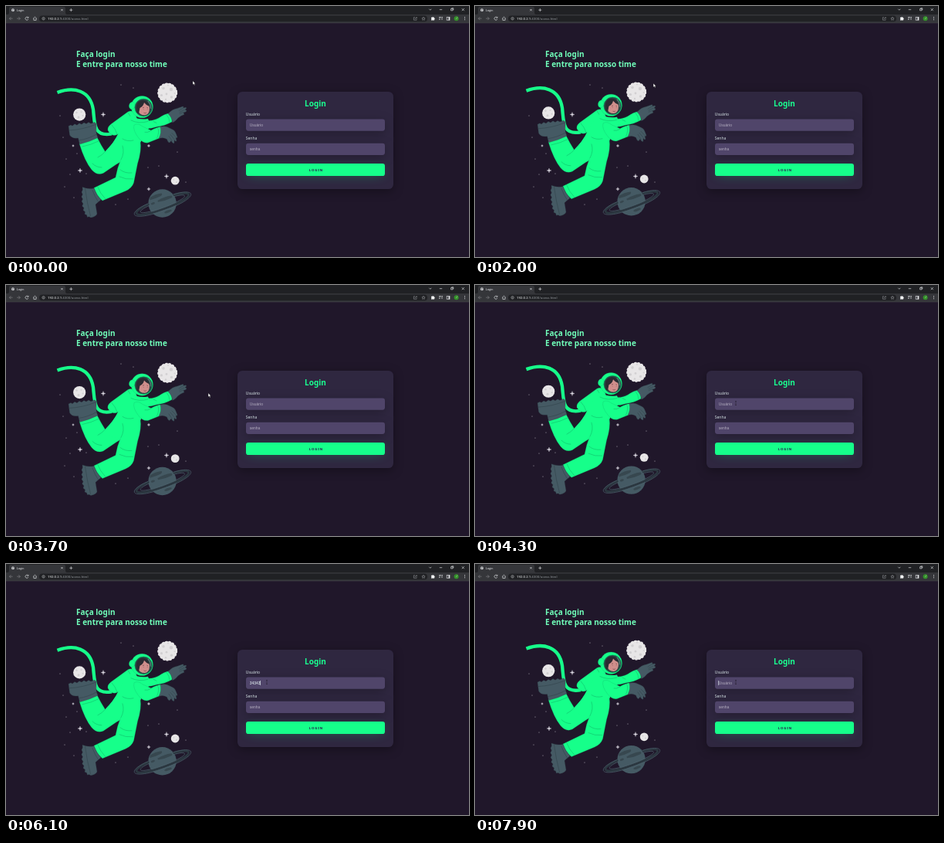
An HTML page for the animation above (8 s loop, 600 px wide and 325 px high).

```html
<!DOCTYPE html>
<html lang="pt">
<head>
<meta charset="utf-8">
<title>Login</title>
<style>
html, body { margin: 0; width: 100%; height: 100%; overflow: hidden; background: #20172a; }
svg { display: block; width: 600px; height: 325px; }
text { font-family: "Noto Sans", sans-serif; white-space: pre; }
.ui { font-family: Roboto, "Open Sans", sans-serif; font-size: 3.9px; }
.field { font-family: "Liberation Sans", Arial, sans-serif; font-size: 5px; }
.icon { fill: none; stroke: #d6d8db; stroke-width: .7; }
.big { font-size: 10px; font-weight: 700; }
.label { font-size: 5px; fill: #f0ffff; fill-opacity: .9; }
.box { fill: #50456a; filter: drop-shadow(0 3.1px 6.25px #00000040); }
.suit { fill: #16ff8a; stroke: #12a866; stroke-width: .25; stroke-linejoin: round; }
.seam { fill: none; stroke: #0e9a5c; stroke-width: .4; stroke-linecap: round; }
.grey { fill: #455a64; stroke: #2f3e46; stroke-width: .3; stroke-linejoin: round; }
.fold { fill: none; stroke: #2f3e46; stroke-width: .5; stroke-linecap: round; }
.rock { fill: #e8e6e7; }
.pit { fill: #d2d0d2; }
</style>
</head>
<body>
<svg viewBox="0 0 600 325">
  <rect width="600" height="325" fill="#20172a"/>

  <g id="browser">
    <rect width="600" height="12" fill="#202124"/>
    <path d="M2 11Q4 11 4 8V3Q4 1 6 1H75Q77 1 77 3V8Q77 11 79 11H600V22H0V11Z" fill="#35363a"/>
    <path d="M0 22H600" stroke="#46474b" stroke-width=".5"/>
    <circle cx="9" cy="5.3" r="2" fill="#c9cbce"/>
    <path d="M7.6 4.6l1.4.5-.4 1.4M9.5 3.6l.3 1 .9.4" class="icon" style="stroke:#45474b;stroke-width:.5"/>
    <text class="ui" x="13.8" y="6.8" fill="#e4e6e9">Login</text>
    <path class="icon" d="M71.3 4l2.4 2.4m0-2.4l-2.4 2.4M82.3 5.2h4m-2-2v4M548.3 3.8l1.5 1.5 1.5-1.5M561.8 4.7h3.4M576.6 3.6h2.3v2.3h-2.3zM577.6 3.6v-.8h2.2v2.2h-.8M590.8 3.2l3 3m0-3l-3 3"/>
    <path class="icon" style="stroke:#7d7f83" d="M8.6 16.2H4.4m2-2l-2 2 2 2M14.2 16.2h4.2m-2-2l2 2-2 2"/>
    <path class="icon" d="M28.8 15.2a2 2 0 1 0 .1 1.8M29 13.8v1.6h-1.6M35.1 16.4l2.4-2.2 2.4 2.2M35.9 16v2.4h3.2V16"/>
    <rect x="43" y="12.6" width="503" height="7.6" rx="3.8" fill="#202124"/>
    <circle class="icon" cx="48.6" cy="16.3" r="1.7" style="stroke-width:.5"/>
    <path class="icon" d="M48.6 16v1.2m0-2v.4" style="stroke-width:.5"/>
    <text class="ui" x="54" y="17.9" style="font-size:4.4px" fill="#f1f3f5">192.0.2.1<tspan fill="#8f9398">:4300/acess.html</tspan></text>
    <path class="icon" style="stroke:#a4a6aa;stroke-width:.5" d="M530 14.7h-1.6v3.5h3.7v-1.2M530 17q.2-1.8 2.6-1.8m-1-1l1 1-1 1M541 14.2l.6 1.4 1.5.2-1.1 1 .3 1.5-1.3-.8-1.3.8.3-1.5-1.1-1 1.5-.2z"/>
    <path fill="#f1f3f4" d="M551 14.8h1.3q.8-1.8 1.6 0h1.2v1.2q1.8.8 0 1.6v1h-4.1v-1q1.2-.8 0-1.6z"/>
    <path class="icon" d="M561 14.5h3.3M561 16h2.2M561 17.5h1.5M565 18v-3.5h1"/>
    <rect class="icon" x="571.2" y="14.4" width="3.8" height="3.8"/>
    <path fill="#e4e6e9" d="M573.5 14.4H575v3.8h-1.5z"/>
    <circle cx="583.6" cy="16.2" r="3" fill="#34922a"/>
    <text class="ui" x="583.6" y="17.4" text-anchor="middle" style="font-size:3.4px" fill="#d4efce">J</text>
    <path d="M594.5 14.4v.1m0 1.6v.1m0 1.6v.1" stroke="#d6d8db" stroke-width=".9" stroke-linecap="round"/>
  </g>

  <g class="big" fill="#70ffba">
    <text x="91" y="65.7">Faça login</text>
    <text x="91" y="79.2">E entre para nosso time</text>
  </g>

  <g id="stars" fill="#dedbe4"></g>

  <g id="moon">
    <circle class="rock" cx="209.2" cy="112.4" r="12.3" stroke="#e8e6e7" stroke-width="1.3" stroke-linecap="round" stroke-dasharray="2 2.6"/>
    <g class="pit">
      <circle cx="204" cy="106.5" r="1.8"/><circle cx="214" cy="108" r="2.2"/>
      <circle cx="208" cy="114" r="1.4"/><circle cx="201.5" cy="115.5" r="1.6"/>
      <circle cx="214.5" cy="118" r="1.7"/><circle cx="207" cy="121" r="1.2"/>
      <circle cx="210" cy="102.5" r=".9"/><circle cx="218.5" cy="113" r=".9"/>
    </g>
  </g>

  <g id="scene">
    <circle class="rock" cx="95.2" cy="140.6" r="8.1"/>
    <g class="pit">
      <circle cx="91.5" cy="138" r="1.2"/><circle cx="97.5" cy="137.2" r="1"/>
      <circle cx="94" cy="144" r="1.5"/><circle cx="99.5" cy="142" r="1"/>
    </g>
    <circle class="rock" cx="219.2" cy="226.2" r="5.4"/>
    <circle class="pit" cx="217.5" cy="225" r=".9"/><circle class="pit" cx="221" cy="228" r="1"/>

    <g id="planet">
      <circle cx="202.6" cy="255.5" r="18.2" fill="#455a64"/>
      <g fill="#37474f" transform="rotate(-20 202.6 255.5)">
        <path d="M190 243Q198 241 206 243Q207 245 204 246Q197 247 189 246ZM198 250Q208 248 217 250Q219 252 216 253Q207 254 198 252Z"/>
        <ellipse cx="191" cy="251.5" rx="2.6" ry="1.4"/><ellipse cx="206" cy="268" rx="5" ry="1.6"/>
      </g>
      <g transform="rotate(-20 202.6 255.5)" fill="none">
        <path d="M186 250.5C158 252 158 263 202.6 263S247 252 219.5 250.5" stroke="#2b3740" stroke-width="2.8"/>
        <path d="M185.5 249.5C154 251 154 265 202.6 265S251 251 220 249.5M187 252.4C165 253.5 165 260.9 202.6 260.9S240 253.5 218.5 252.4" stroke="#4b606a" stroke-width=".7"/>
      </g>
    </g>

    <g id="astronaut">
      <path d="M66.5 112C88 104 109 109 113 134C115 152 113 170 137 165.5" fill="none" stroke="#16ff8a" stroke-width="4.3"/>
      <path class="suit" d="M132 161Q131 157 136 153L158 137Q164 134 168 140L171 151L143 167Q136 169 132 161Z"/>
      <path class="seam" d="M137 154Q142 159 144 166M158 138Q163 144 164 150"/>

      <!-- raised arm -->
      <path class="suit" d="M180 148Q190 149.5 198 145Q205 140 211 139Q216 143 215 150Q206 155 195 156.5Q184 160 177 158Z"/>
      <path class="seam" d="M191 149.5l4 2M208 140.5q4 5 4 10"/>
      <path class="grey" d="M210 139.5Q216 133 222 132.5L229 130Q231 130 229.5 132L233 131.3Q235 132 232 134.3L234 135.3Q234 137.3 230 138L231 140.5Q227 141.5 223 145Q219 150 215.5 151Q215 144 210 139.5Z"/>
      <path class="fold" d="M224 135.5l5-3M225 137.5l6-3M225 139.5l5-2"/>

      <!-- bent leg with boot -->
      <path class="suit" d="M95 178L118 170Q123 180 128.5 188.5Q138 179 146 167L165 182Q158 198 143 205L126 216.5Q118 220 111 212Q102 201 95 178Z"/>
      <path class="seam" d="M99 182Q110 180 121 174.5M128.5 188.5Q125 193 119 196M112 204q5 5 12 5"/>
      <path class="grey" d="M81 155.5L84 154L86 155.2L89 152.8L92 154.2L95 151.8L98 153.2L101 151L104 152.6L107 150.6L110 152.2L115 150.4Q118 152 117 157Q116 164 119 170.5Q108 176 95.5 179L93.5 171Q85 172 82.5 167Z"/>
      <path class="fold" d="M82 161Q100 160 116 153.5M94.5 174Q107 172 117.5 166"/>

      <!-- straight leg with boot -->
      <path class="suit" d="M144 184L174 175Q176 187 170.5 204L165.5 229Q163 236 155 239.5L125 252Q117 246 114 235.5L142 222Q144 210 149 198Z"/>
      <path class="seam" d="M118.5 233.5Q122 243 129 250M164.5 224Q155 225 147 221M148 212q6 5 15 4"/>
      <path class="grey" d="M99 234.5Q106 237.5 114 236Q117 244 123 251Q118 255 116 257L118 269Q117 272.5 110 274L107.5 272.7L105.5 273.4L104.5 270.5L102 269.5L102.5 266.5L100 264.5L101 261.5L98.7 259L100 256L98 253L99.5 250L97.8 247L99.3 244L98 241L99.3 238Z"/>
      <path class="fold" d="M102.5 236.5Q105 255 109.5 272M112 238.5Q115 247 119.5 253.5"/>

      <!-- torso -->
      <path class="suit" stroke="none" style="stroke:none" d="M162 142Q172 148 184 146Q188 154 184 160Q178 168 174 177Q164 194 148 200Q133 200 128.5 189Q140 177 146 164Q152 152 162 142Z"/>
      <path class="seam" d="M149 199Q154 190 151 181M162 148Q172 153 184 149.5M151 172q6 4 14 2"/>

      <!-- lower arm -->
      <path class="suit" d="M166 154Q171 151 177 156L188 161Q196 156.5 201 156.5Q204 163.5 199 171L184 177Q177 178 172 171Q164 161 166 154Z"/>
      <path class="seam" d="M196.5 157.5q3 5-1 14M180 163.5q3 1 8-2"/>
      <path class="grey" d="M200 156.5Q207 154.5 213 158.5Q219 160.5 220 164.5L222 169.5Q222 171.5 220 170.5L221 174.5Q220 176.5 218 173.5L218 177.5Q216 178.5 214 174.5L212 177Q210 177 208.5 172.5Q204 169.5 198 171.5Q202 164.5 200 156.5Z"/>
      <path class="fold" d="M213 166.5l5 6M211 168.5l4 6M215 164.5l5 5"/>

      <!-- helmet -->
      <circle class="suit" cx="176.3" cy="130.6" r="14.2"/>
      <ellipse class="suit" cx="163.3" cy="129" rx="3.8" ry="4.8" transform="rotate(15 163.3 129)"/>
      <circle cx="178.2" cy="131.6" r="11.3" fill="#294a47" stroke="#0f8a56" stroke-width=".5"/>
      <path d="M172 130Q177 128 179 124.5Q185 125 186 132Q186 140.5 180 141.3Q173 141.5 171 135Z" fill="#d08f8c"/>
      <path d="M169.5 138Q166.5 124 176 122Q184 121 186 130Q181 128 179 125Q178 130 173.5 132L172 139.5Z" fill="#2a2b32"/>
      <path d="M177 131.8l2-.6m3.5.3l1.5.6M178.2 133.6v.6m5-.5v.6M178.5 138.4q2 1 3.5-.2" fill="none" stroke="#4a292e" stroke-width=".5"/>
      <path d="M184 123Q188 127 187.8 133" fill="none" stroke="#8fb8ac" stroke-width=".6"/>
    </g>
  </g>

  <g id="card">
    <rect x="300" y="111" width="202" height="126" rx="6.3" fill="#2f2740" style="filter:drop-shadow(0 3.1px 6.25px #00000056)"/>
    <text class="big" x="401" y="130.3" text-anchor="middle" fill="#1aff90">Login</text>
    <text class="label" x="310.8" y="142">Usuário</text>
    <text class="label" x="310.8" y="173.2">Senha</text>
    <rect class="box" x="311" y="146.5" width="180" height="15.2" rx="3.1"/>
    <rect class="box" x="311" y="177.7" width="180" height="15.2" rx="3.1"/>
    <text class="field" id="user" x="315.7" y="155.7"></text>
    <text class="field" x="315.7" y="187" fill="#b3adbf">senha</text>
    <rect id="caret" y="151" width=".6" height="6" fill="#f0ffff"/>
    <rect x="314.8" y="211" width="172.4" height="8.2" fill="#00ff8052" style="filter:blur(6.25px)"/>
    <rect x="311" y="204" width="180" height="16" rx="3.1" fill="#16ff8a"/>
    <text x="402" y="213.5" text-anchor="middle" fill="#2b134b" style="font-size:4.17px;font-weight:800;letter-spacing:.94px">LOGIN</text>
  </g>

  <path id="arrow" d="M0 0V4.8L1.2 3.8L2 5.6L2.8 5.2L2 3.5H3.4Z" fill="#fff" stroke="#111" stroke-width=".3"/>
  <path id="beam" d="M-1-2.5H1M0-2.5V2.5M-1 2.5H1" fill="none" stroke="#1d1727" stroke-width=".5"/>
</svg>
<script>
const LOOP = 8000, STEP = 100;
const $ = id => document.getElementById(id);

// Four-pointed stars: x, y, radius
const sparks = [[126,140.5,3], [96,213,3], [208,220.5,3], [185,237,2.2], [185,181,1.8], [87,181,1.4]];
const dots = [[149,102], [165,106], [74,170], [92,191], [83,218], [70,142], [76,234], [88,248],
  [142,257], [158,250], [222,189], [198,207], [233,228], [184,209], [104,217], [78,198]];
$('stars').innerHTML =
  sparks.map(([x, y, r]) => `<path d="M${x} ${y - r}Q${x} ${y} ${x + r} ${y}Q${x} ${y} ${x} ${y + r}Q${x} ${y} ${x - r} ${y}Q${x} ${y} ${x} ${y - r}" stroke="#dedbe4" stroke-width=".35"/>`).join('') +
  dots.map(([x, y]) => `<circle cx="${x}" cy="${y}" r=".55" opacity=".8"/>`).join('');

// Field content from each time on; the first entry is the click
const keys = [[4600, ''], [5100, '3'], [5200, '34'], [5500, '343'], [5700, '3434'], [6000, '34343'],
  [6300, '343434'], [6600, '3434345'], [7200, '343434'], [7300, '34343'], [7400, '3434'],
  [7500, '343'], [7600, '34'], [7700, '3'], [7800, '']];

// Pointer stops: time, x, y
const stops = [[0, 242, 97], [1800, 242, 97], [2700, 156, 122], [3200, 156, 122], [4100, 338, 153], [LOOP, 338, 153]];

const triangle = p => 1 - Math.abs(1 - 2 * (p - Math.floor(p)));
const place = (el, x, y) => el.setAttribute('transform', `translate(${x} ${y})`);
const show = (el, on) => el.setAttribute('visibility', on ? 'visible' : 'hidden');

function pointer(t) {
  const i = stops.findIndex(s => s[0] > t);
  const [t0, x0, y0] = stops[i - 1], [t1, x1, y1] = stops[i];
  const p = (t - t0) / (t1 - t0), e = p * p * (3 - 2 * p);
  return [x0 + (x1 - x0) * e, y0 + (y1 - y0) * e];
}

function drawPointer(t) {
  const [x, y] = pointer(t);
  const inField = x > 311 && x < 491 && y > 146 && y < 162;
  place($('arrow'), x, y);
  place($('beam'), x, y);
  show($('arrow'), !inField);
  show($('beam'), inField);
}

function drawField(t) {
  const key = keys.filter(k => k[0] <= t).pop();
  const value = key ? key[1] : '', user = $('user');
  user.textContent = value || 'Usuário';
  user.setAttribute('fill', value ? '#f0ffff' : '#b3adbf');
  $('caret').setAttribute('x', 315.5 + (value ? user.getComputedTextLength() : 0));
  show($('caret'), key && (t - key[0]) % 1000 < 500);
}

function draw() {
  const t = Math.floor(performance.now() % LOOP / STEP) * STEP;
  place($('scene'), 0, -3.3 * triangle(t / 3000));
  place($('moon'), 0, 1.5 - 3 * triangle((t - 750) / 3000));
  drawPointer(t);
  drawField(t);
  requestAnimationFrame(draw);
}
draw();
</script>
</body>
</html>
```
